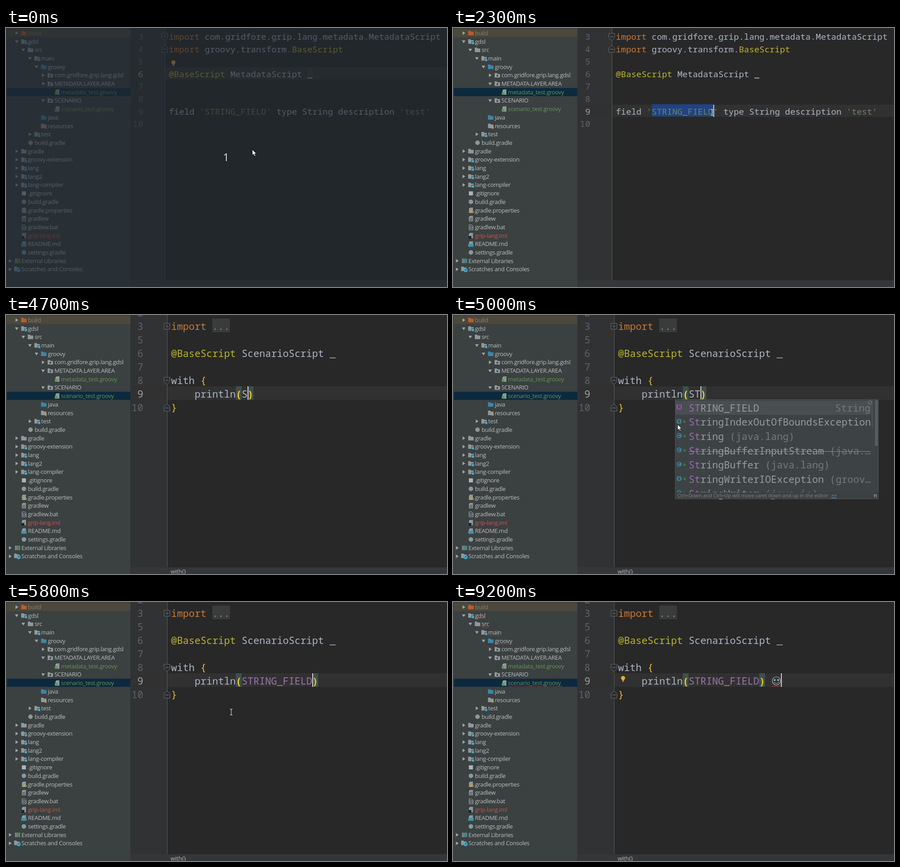
An HTML page for the animation above (9.4 s loop, 975 px wide and 574 px high).

```html
<!DOCTYPE html>
<html lang="en">
<head>
<meta charset="utf-8">
<title>Script field completion</title>
<style>
  html, body { margin: 0; width: 100%; height: 100%; overflow: hidden; background: #282828; }
  svg { display: block; width: 100vw; height: 100vh; }
  text { white-space: pre; }
  .ui { font: 13px "Open Sans", "Noto Sans", sans-serif; letter-spacing: -.35px; }
  .hint { font-size: 11px; letter-spacing: 0; }
  .code { font-family: "Noto Sans Mono", "DejaVu Sans Mono", monospace; }
</style>
</head>
<body>
<svg viewBox="0 0 975 574">
  <rect width="275" height="574" fill="#3b4041"/>
  <rect x="2" y="2" width="273" height="18" fill="#4c483c"/>
  <g id="mark"></g>
  <g id="tree"></g>
  <g id="editor"></g>
  <rect id="dim" width="975" height="574" fill="#20282f"/>
  <g id="top"></g>
</svg>
<script>
const LOOP = 9400;
const TEXT = '#a9b7c6', ORANGE = '#cc7832', GREEN = '#6a8759', LIME = '#bbb529',
      PURPLE = '#9876aa', YELLOW = '#e8ba36', DIM = '#606366', LIT = '#a4a3a3';

const $ = id => document.getElementById(id);
const rect = (x, y, w, h, fill, more = '') =>
  `<rect x="${x}" y="${y}" width="${w}" height="${h}" fill="${fill}" ${more}/>`;
const path = (d, stroke, fill = 'none', w = 1) =>
  `<path d="${d}" stroke="${stroke}" stroke-width="${w}" fill="${fill}"/>`;
const dot = (x, y, r, fill, more = '') => `<circle cx="${x}" cy="${y}" r="${r}" fill="${fill}" ${more}/>`;
const ui = (x, y, s, fill, cls = '') => `<text class="ui ${cls}" x="${x}" y="${y}" fill="${fill}">${s}</text>`;

// parts: alternating text and colour
function code(x, y, size, ...parts) {
  let spans = '';
  for (let i = 0; i < parts.length; i += 2) spans += `<tspan fill="${parts[i + 1]}">${parts[i]}</tspan>`;
  return `<text class="code" font-size="${size}" x="${x}" y="${y}">${spans}</text>`;
}

function wave(x, y, w, color) {
  let d = `M${x} ${y}`;
  for (let i = 2; i <= w; i += 2) d += `L${x + i} ${y + (i % 4 ? -2 : 0)}`;
  return path(d, color);
}

// ---- project tree ----
const ROW = 18.7;
const rowY = i => 11.2 + ROW * i;
const textX = depth => 34 + 14.6 * depth;

// depth, arrow (> closed, v open, - none), icon, label
const rows = `
1 > out build
1 v mod gdsl
2 v dir src
3 v mod main
4 v src groovy
5 > pkg com.gridfore.grip.lang.gdsl
5 v pkg METADATA.LAYER.AREA
6 - scr metadata_test.groovy
5 v pkg SCENARIO
6 - scr scenario_test.groovy
4 - src java
4 - res resources
3 > mod test
2 - gra build.gradle
1 > dir gradle
1 > mod groovy-extension
1 > mod lang
1 > mod lang2
1 > mod lang-compiler
1 - git .gitignore
1 - gra build.gradle
1 - prp gradle.properties
1 - txt gradlew
1 - bat gradlew.bat
1 - iml grip-lang.iml
1 - md README.md
1 - gra settings.gradle
0 > lib External Libraries
0 > tmp Scratches and Consoles`.trim().split('\n').map(line => {
  const [depth, arrow, icon, ...label] = line.split(' ');
  return { depth: +depth, arrow, icon, label: label.join(' ') };
});

function folder(x, y, fill) {
  return path(`M${x - 6} ${y - 5}h5l1.5 2h5.5v8h-12z`, 'none', fill);
}
function sheet(x, y) {
  return path(`M${x - 1} ${y - 6}h5.5v12h-9v-8.5z`, 'none', '#8d979b') +
    path(`M${x - 4.5} ${y - 3}l3 -3v3z`, 'none', '#b5bcbf');
}
const icons = {
  out: (x, y) => folder(x, y, '#bd5b2b'),
  dir: (x, y) => folder(x, y, '#8f999d'),
  src: (x, y) => folder(x, y, '#3c87a8'),
  mod: (x, y) => folder(x, y, '#8f999d') + rect(x + 1, y, 6, 6, '#3b4041') + rect(x + 2, y + 1, 5, 5, '#42b0d4'),
  pkg: (x, y) => folder(x, y, '#8f999d') + dot(x, y + 1, 2, '#3b4041'),
  res: (x, y) => folder(x, y, '#8f999d') + path(`M${x + 2} ${y + 2}h5m-5 2h5m-5 2h5`, '#d09a3e'),
  scr: (x, y) => sheet(x + 1, y) + dot(x - 2, y + 3, 3.2, '#5b9a4b'),
  gra: (x, y) => dot(x, y, 5, '#87999f'),
  git: (x, y) => rect(x - 4.5, y - 4.5, 9, 9, '#adb4b7'),
  prp: (x, y) => sheet(x, y) + rect(x - 1, y + 1, 2, 5, '#d0a040') + rect(x + 2, y - 1, 2, 7, '#d0a040') + rect(x + 5, y + 2, 2, 4, '#62a050'),
  txt: (x, y) => sheet(x, y) + path(`M${x - 3} ${y - 1}h6m-6 2.5h6m-6 2.5h6`, '#3b4041'),
  bat: (x, y) => path(`M${x - 4} ${y - 5}h6l3 3v8h-9z`, '#adb4b7') + path(`M${x - 2} ${y - 1}h5v4h-5z`, '#adb4b7'),
  iml: (x, y) => sheet(x, y) + rect(x - 5, y + 1, 6, 6, '#202324'),
  md: (x, y) => sheet(x, y) + rect(x - 6, y, 12, 6, '#3f91b0'),
  lib: (x, y) => [-5, -2, 1, 4].map((dx, i) => rect(x + dx, y - 5, 2, 10, i < 2 ? '#8f999d' : i < 3 ? '#62a050' : '#42a5c8')).join(''),
  tmp: (x, y) => folder(x - 1, y - 1, '#8f999d') + dot(x + 3, y + 2, 4.5, '#42a5c8') + path(`M${x + 3} ${y - 1}v3h2`, '#24363f')
};

$('tree').innerHTML = rows.map(({ depth, arrow, icon, label }, i) => {
  const x = textX(depth), y = rowY(i), ax = x - 25;
  const color = icon === 'out' ? '#85836f' : icon === 'scr' ? '#629755' : icon === 'iml' ? '#c75450' : '#bbbdbd';
  const tip = arrow === '>' ? `M${ax - 2.5} ${y - 4}l6 4l-6 4z`
            : arrow === 'v' ? `M${ax - 4} ${y - 2.5}h8l-4 6z` : '';
  return (tip && path(tip, 'none', '#a0a5a7')) + icons[icon](x - 9, y) + ui(x, y + 4.6, label, color);
}).join('');

function treeMarks(t) {
  let out = rect(2, Math.round(rowY(t < 3400 ? 7 : 9) - 9.3), 273, 18, '#0d293e');
  if (t >= 7800) {
    for (const [i, w] of [[1, 24], [2, 16], [3, 28], [4, 40], [9, 120]])
      out += wave(textX(rows[i].depth), rowY(i) + 8, w, '#a8423f');
  }
  return out;
}

// ---- editor ----
function frame(gutter, rowTop, rowH) {
  return rect(275, 0, 700, 574, '#282828') + rect(275, 0, gutter - 275, 574, '#303233') +
    rect(275, rowTop, 700, rowH, '#313131') +
    path(`M${gutter + .5} 0V558`, '#5a5d5e') + rect(275, 559, 700, 15, '#343739');
}
function number(n, y, size, lit) {
  return `<text class="code" font-size="${size}" x="303.5" y="${y}" text-anchor="end" fill="${lit ? LIT : DIM}">${n}</text>`;
}
// dir: 1 opens downward, -1 closes upward
function fold(x, y, dir) {
  return path(`M${x - 6.5} ${y - 7 * dir}h13v${10 * dir}l-6.5 ${6 * dir}l-6.5 ${-6 * dir}z`, '#6b6e6f', '#2b2c2d') +
    path(`M${x - 3.5} ${y}h7`, '#8a8d8e');
}
function bulb(x, y) {
  return dot(x, y - 1.5, 4.5, '#f0a732') + rect(x - 2, y + 2, 4, 2, '#f0a732') + rect(x - 2, y + 4.5, 4, 2, '#9a9da0');
}
const caret = (x, y, h) => rect(x, y, 2, h, '#d0d0d0');

function metadataView(t) {
  const size = 18.9, w = 11.34, x0 = 360, y = i => 26 + 27.6 * i, top = i => Math.round(y(i) - 22);
  const picked = t >= 1400, cur = picked ? 6 : 3;
  let out = frame(351, top(cur), 27);
  for (let i = 0; i < 8; i++) out += number(i + 3, y(i), size, i === cur);
  out += fold(351, 19, 1) + fold(351, 47, -1);
  if (t < 1900) out += rect(666, 87, 12, 26, '#344134');
  if (t >= 1500) out += rect(x0 + 7 * w, top(6) - 1, 12 * w, 27, '#214283');
  if (!picked) out += bulb(370, 77.5);
  else if (t >= 2500) out += bulb(370, 160.5);
  out += code(x0, y(0), size, 'import ', ORANGE, 'com.gridfore.grip.lang.metadata.MetadataScript', TEXT) +
    code(x0, y(1), size, 'import ', ORANGE, 'groovy.transform.', TEXT, 'BaseScript', LIME) +
    code(x0, y(3), size, '@BaseScript', LIME, ' MetadataScript _', TEXT) + wave(667, 113, 10, '#77797a') +
    code(x0, y(6), size, 'field ', TEXT, "'STRING_FIELD'", GREEN, ' type String description ', TEXT, "'test'", GREEN);
  if (picked && t < 3400) out += caret(x0 + 19 * w, top(6), 27);
  return out;
}

const typing = [[0, 0], [4600, 1], [4900, 2], [5200, 3], [5700, 4], [5800, 12]];
const typed = t => 'STRING_FIELD'.slice(0, typing.filter(k => t >= k[0]).pop()[1]);

function smiley(x, y) {
  const ink = '#b7c2cd';
  const heart = dx => path(`M${x + dx} ${y + .5}l-2.2 -2.4q0 -1.8 1.2 -1.8q.7 0 1 .8q.3 -.8 1 -.8q1.2 0 1.2 1.8z`, 'none', ink);
  return dot(x, y, 9, 'none', `stroke="${ink}" stroke-width="1.2"`) + heart(-3.8) + heart(3.8) +
    path(`M${x - 5} ${y + 2.5}q5 6.5 10 0`, ink, 'none', 1.2);
}

function scenarioView(t) {
  const size = 21.67, w = 13, x0 = 365, y = i => 32.5 + 30 * i;
  const word = typed(t), open = x0 + 11 * w, inner = open + w, close = inner + word.length * w;
  const lineNo = [3, 5, 6, 7, 8, 9, 10];
  let out = frame(356, 158, 30) + number(2, 2.5, size);
  lineNo.forEach((n, i) => out += number(n, y(i), size, n === 9));
  out += path('M349.5 18.5h13v13h-13zM352 25h8M356 21v8', '#6b6e6f', '#2b2c2d') + fold(356, 145, 1) + fold(356, 206, -1);
  out += rect(456, 8, 39, 30, '#3a3c3b') + code(x0, y(0), size, 'import ', ORANGE, '...', '#8c8c8c');
  out += code(x0, y(2), size, '@BaseScript', LIME, ' ScenarioScript _', TEXT) + wave(717, 96, 12, '#77797a');
  out += code(x0, y(4), size, 'with ', TEXT, '{', YELLOW) + code(x0, y(6), size, '}', YELLOW);

  out += rect(open, 158, w, 30, '#3b514d') + rect(close, 158, w, 30, '#3b514d');
  const whole = word.length === 12;
  if (t >= 6100 && t < 8300) out += rect(inner, 158, close - inner, 30, '#344134');
  out += code(x0, y(5), size, '    println', TEXT) +
    `<g font-weight="600">${code(open, y(5), size, '(', '#ffc620')}${code(close, y(5), size, ')', '#ffc620')}</g>` +
    code(inner, y(5), size, word, whole ? PURPLE : TEXT);
  if (t >= 7400) out += smiley(715, 175);
  if (t >= 7900) out += wave(705, 188, 20, '#bc3f3c');
  if ((t >= 3700 && t < 4600) || t >= 8400) out += bulb(376, 170);

  const cx = t < 6700 ? close : t < 6900 ? close + w : t < 7400 ? close + 2 * w : 725;
  const blinkOff = (t >= 7900 && t < 8300) || (t >= 8800 && t < 9200);
  if (!blinkOff) out += caret(cx, 158, 30);
  if (t >= 3700) out += ui(364, 573, 'with{}', '#b4b6b7');
  if (t >= 5000 && t < 5800) out += popup(word);
  return out;
}

// name, package, badge
const hits = [
  ['STRING_FIELD', '', 'R'],
  ['StringIndexOutOfBoundsException', '', '!'],
  ['String', ' (java.lang)', 'C'],
  ['StringBufferInputStream', ' (java.…', 'C'],
  ['StringBuffer', ' (java.lang)', 'C'],
  ['StringWriterIOException', ' (groov…', '!'],
  ['StringWriter', ' (java.io)', 'C']
];
function badge(kind, x, y) {
  if (kind === 'R') return rect(x - 6, y - 6, 12, 12, '#7d5a94', 'rx="2"') + ui(x - 3, y + 3.5, 'R', '#2f2436', 'hint');
  const sign = kind === '!' ? path(`M${x + 1} ${y - 4}l-3 4.5h4l-2 3.5`, '#23373d', 'none', 1.3)
                            : path(`M${x + 2} ${y - 2}a2.8 2.8 0 1 0 0 4`, '#23373d', 'none', 1.4);
  return dot(x, y, 5.6, '#437f92') + sign + rect(x + 10, y, 4, 3, '#4f8548') + path(`M${x + 10.5} ${y}v-2h2`, '#4f8548');
}
function popup(query) {
  const faint = '#74787a';
  let out = rect(491.5, 187.5, 449, 220, '#3d4345', 'stroke="#515557"') + rect(492, 190, 437, 31, '#494e50') +
    rect(925, 221, 4, 30, '#494e50') + rect(933, 189, 6, 101, '#585d5f');
  hits.forEach(([name, pack, kind], i) => {
    const y = 206 + 31.7 * i;
    const big = name.indexOf('I', 3), fourth = query.length < 4 ? -1 : big < 0 ? 3 : big;
    const parts = [...name].flatMap((c, k) => [c, k < Math.min(3, query.length) || k === fourth ? '#a068ae' : '#989b9d']);
    out += badge(kind, 500, y - 2) + code(521, y + 7.5, 21.67, ...parts, pack, faint);
    if (i === 3) out += path('M521 302.5H923', '#8d9193');
  });
  out += code(845, 213.5, 21.67, 'String', faint);
  for (let a = 0; a < 8; a++)
    out += `<path d="M0 -2.5V-5" transform="translate(922 194) rotate(${a * 45})" stroke="#8f9496"/>`;
  return out + rect(492, 393, 448, 14, '#3b4042') +
    ui(496, 404, 'Ctrl+Down and Ctrl+Up will move caret down and up in the editor', '#808486', 'hint') +
    ui(836, 404, '<tspan text-decoration="underline">&gt;&gt;</tspan>', '#589df6', 'hint') + ui(930, 404, 'π', '#c5c8ca', 'hint');
}

// ---- pointer ----
// start, end, from, to, sideways bend
const moves = [
  [500, 1200, [545, 271], [556, 180], 30],
  [2200, 2300, [556, 180], [573, 187], 0],
  [2400, 3000, [573, 187], [186, 177], 0],
  [4000, 4300, [186, 177], [498, 244], 0],
  [6000, 6300, [498, 244], [569, 224], 0],
  [6400, 6700, [569, 224], [746, 187], 0]
];
const arrow = (x, y) => path(`M${x + .5} ${y + .5}v12.5l3 -2.6l2.2 4.8l2.2 -1l-2.1 -4.6h4z`, '#16181a', '#fff');
const beam = (x, y) => path(`M${x - 3} ${y - 6.5}h2.2l.8 .8l.8 -.8h2.2M${x} ${y - 6}v12M${x - 3} ${y + 6.5}h2.2l.8 -.8l.8 .8h2.2`, '#e4e4e4', 'none', 1.1);

function pointer(t) {
  if (t < 200) return arrow(544, 269);
  if (t >= 8700 && t < 9000) return arrow(255, 50);
  if ((t >= 4600 && t < 5000) || (t >= 6900 && t < 8300) || t >= 8500) return '';
  if (t >= 5000 && t < 5800) return arrow(496, 242);
  let [x, y] = moves[0][2];
  for (const [a, b, from, to, bend] of moves) {
    if (t < a) break;
    const u = Math.min(1, (t - a) / (b - a)), e = u * u * (3 - 2 * u);
    x = from[0] + (to[0] - from[0]) * e + bend * 2 * e * (1 - e);
    y = from[1] + (to[1] - from[1]) * e;
  }
  return x < 275 ? arrow(x, y) : beam(x, y);
}

// ---- playback in steps of 100 ms ----
let shown = -1;
function draw(t) {
  $('mark').innerHTML = treeMarks(t);
  $('editor').innerHTML = t < 3600 ? metadataView(t) : scenarioView(t);
  $('dim').setAttribute('opacity', t < 100 ? .64 : t < 200 ? .32 : 0);
  $('top').innerHTML = pointer(t) +
    (t < 100 ? '<text x="480" y="295" font-family="Open Sans, sans-serif" font-size="23" fill="#e0e2e3">1</text>' : '');
}
const start = performance.now();
function tick() {
  const t = Math.floor((performance.now() - start) % LOOP / 100) * 100;
  if (t !== shown) draw(shown = t);
  requestAnimationFrame(tick);
}
tick();
</script>
</body>
</html>
```
